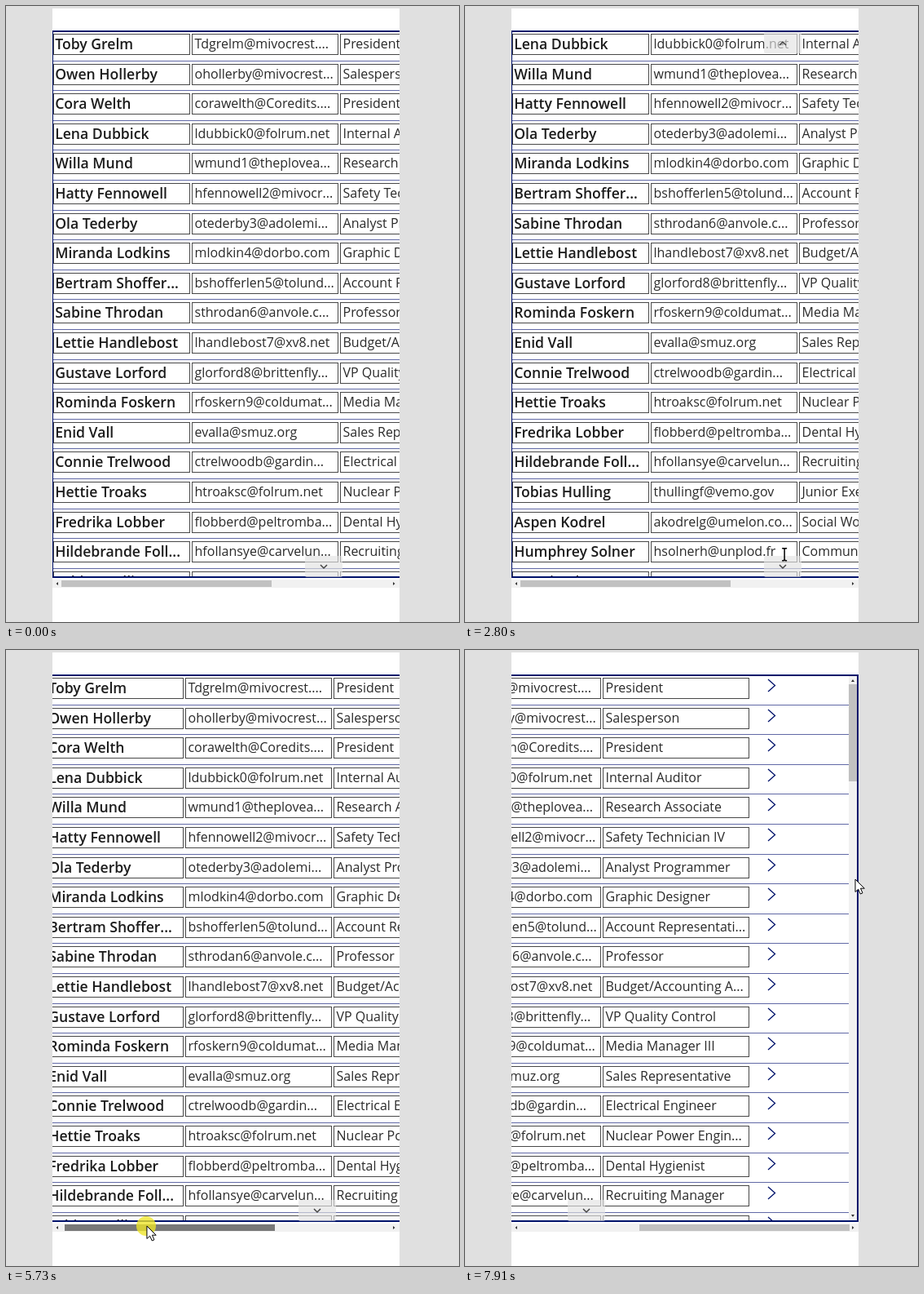
An HTML page for the animation above (8000 ms loop, 556 by 755 pixels).

```html
<!DOCTYPE html>
<html lang="en">
<head>
<meta charset="utf-8">
<style>
  html, body { margin: 0; height: 100%; overflow: hidden; background: #e0e0e0; }
  div, svg { position: absolute; box-sizing: border-box; }
  #page { left: 57px; top: 3px; width: 426px; height: 752px; background: #fff; overflow: hidden; }
  #view { left: -57px; top: -3px; width: 724px; height: 755px; }
  #list { left: 57px; top: 30px; width: 667px; height: 669px; overflow: hidden; }
  #frame { left: 57px; top: 30px; width: 667px; height: 671px; border: 2px solid #00126b; border-left-width: 1px; }
  .row { left: 0; width: 655px; height: 37px; border-top: 1px solid #6169a6; }
  .cell { top: 3px; width: 180px; height: 26px; border: 1px solid #484848; padding-left: 2.5px;
    font: 16px/22px "Open Sans", sans-serif; color: #2a2a2a; white-space: nowrap; overflow: hidden; }
  .name { left: 1px; width: 168px; padding-left: 1.2px; font-size: 17.6px; font-weight: 600; color: #1c1c1c; }
  .mail { left: 171px; }
  .job { left: 353px; }
  svg { fill: none; overflow: visible; }
  .open { left: 556px; top: 5px; stroke: #00126b; stroke-width: 1.3; }
  .button { left: 367px; width: 46px; height: 26px; border-radius: 2px; background: rgba(226,226,226,.65); }
  .button svg { left: 19px; top: 11px; stroke: #444; stroke-width: 1.5; }
  .button.hover { background: rgba(208,208,208,.92); box-shadow: inset 0 0 0 1px #555; }
  .button.hover svg { stroke: #000; stroke-width: 2; }
  .track { background: #f1f1f1; }
  .thumb { background: #c1c1c1; }
  .arrow { fill: #333; }
  #halo { width: 24px; height: 24px; margin: -12px; border-radius: 50%; background: rgba(238,230,40,.78); }
  #cursors { left: 0; top: 0; width: 1px; height: 1px; fill: #fff; stroke: #000; stroke-linejoin: round; }
</style>
</head>
<body>
<div id="page">
  <div id="view">
    <div id="list"><div id="rows"></div></div>
    <div class="track" style="left:712px;top:32px;width:10px;height:667px">
      <div class="thumb" style="top:10px;width:10px;height:119px"></div>
      <svg class="arrow" width="10" height="667"><path d="M3 7h4l-2-3zM3 660h4l-2 3z"/></svg>
    </div>
    <div id="frame"></div>
    <div id="up" class="button" style="top:32px"><svg width="8" height="5"><path d="M0 5L4 1L8 5"/></svg></div>
    <div id="down" class="button" style="top:674px"><svg width="8" height="5"><path d="M0 0L4 4L8 0"/></svg></div>
  </div>
  <div class="track" style="left:0;top:700px;width:426px;height:10px">
    <div id="thumb" class="thumb" style="top:1px;width:258px;height:8px"></div>
    <svg class="arrow" width="426" height="10"><path d="M7 3v4l-2.500-2zM418 3v4l2.500-2z"/></svg>
  </div>
</div>
<div id="halo"></div>
<svg id="cursors">
  <path id="arrow" d="M0 0V15.500L3.700 12.200L6.300 18L9 16.800L6.500 11.200H11.300Z"/>
  <path id="hand" d="M-2 13V2Q0-1 2 2V8Q4 6 5 8Q7 7 8 9Q10 9 10 11V15Q10 18 8 22H0Q-1 19-5 14Q-6 11-2 13Z"/>
  <path id="beam" fill="none" stroke-width="1.500" d="M-3-7.500H-1L0-6.500L1-7.500H3M0-6.500V6.500M-3 7.500H-1L0 6.500L1 7.500H3"/>
</svg>
<script>
const LOOP = 8000, PITCH = 36.6;
const STEP = 121, START = 290;
const MAX_DRAG = 146, MAX_SCROLL = 241;

const people = `Toby Grelm|Tdgrelm@mivocrest....|President
Owen Hollerby|ohollerby@mivocrest...|Salesperson
Cora Welth|corawelth@Coredits....|President
Lena Dubbick|ldubbick0@folrum.net|Internal Auditor
Willa Mund|wmund1@theplovea...|Research Associate
Hatty Fennowell|hfennowell2@mivocr...|Safety Technician IV
Ola Tederby|otederby3@adolemi...|Analyst Programmer
Miranda Lodkins|mlodkin4@dorbo.com|Graphic Designer
Bertram Shoffer...|bshofferlen5@tolund...|Account Representati...
Sabine Throdan|sthrodan6@anvole.c...|Professor
Lettie Handlebost|lhandlebost7@xv8.net|Budget/Accounting A...
Gustave Lorford|glorford8@brittenfly...|VP Quality Control
Rominda Foskern|rfoskern9@coldumat...|Media Manager III
Enid Vall|evalla@smuz.org|Sales Representative
Connie Trelwood|ctrelwoodb@gardin...|Electrical Engineer
Hettie Troaks|htroaksc@folrum.net|Nuclear Power Engin...
Fredrika Lobber|flobberd@peltromba...|Dental Hygienist
Hildebrande Foll...|hfollansye@carvelun...|Recruiting Manager
Tobias Hulling|thullingf@vemo.gov|Junior Executive
Aspen Kodrel|akodrelg@umelon.co...|Social Worker
Humphrey Solner|hsolnerh@unplod.fr|Community Outreach...
Corwin Plaster|cplasteri@dorvantec...|Marketing Manager`.split("\n");

const $ = id => document.getElementById(id);
$("rows").innerHTML = people.map((line, i) => {
  const [name, mail, job] = line.split("|");
  return `<div class="row" style="top:${i * PITCH}px">
    <div class="cell name">${name}</div><div class="cell mail">${mail}</div><div class="cell job">${job}</div>
    <svg class="open" width="9" height="15"><path d="M0 0L8.500 7.500L0 15"/></svg></div>`;
}).join("");

const entry = [536, 738], overDown = [392, 693], overUp = [396, 46], onThumb = [168, 706], edge = [479, 281];
const scrollDown = [1630, 2220, 2570], scrollUp = [3670, 3900, 4020];
const clicks = [1020, 1630, 2570, 3420, 3790];

const clamp = (v, lo, hi) => Math.max(lo, Math.min(hi, v));
const ramp = (t, start, end) => clamp((t - start) / (end - start), 0, 1);
const mix = (a, b, k) => a.map((v, i) => v + (b[i] - v) * k);
const passed = (times, t) => times.filter(time => time <= t).length;

const dragAt = t => clamp((t - 5708) * .1724, 0, MAX_DRAG);

function pointerAt(t) {
  let p = mix(entry, overDown, ramp(t, START, 770));
  p = mix(p, overUp, ramp(t, 2690, 3310));
  p = mix(p, overDown, ramp(t, 4400, 4880));
  p = mix(p, onThumb, ramp(t, 4880, 5240));
  p[0] += 1.06 * dragAt(t);
  return mix(p, edge, ramp(t, 7300, 7910));
}

function draw(t) {
  const sampled = START + STEP * Math.floor((t - START) / STEP + .2);
  const [x, y] = pointerAt(sampled), drag = dragAt(sampled);
  const scroll = Math.round(drag * MAX_SCROLL / MAX_DRAG);
  const row = passed(scrollDown, t) - passed(scrollUp, t);
  const dragging = t >= 5600 && t < 7080;
  const pressed = dragging || clicks.some(time => t >= time && t < time + STEP);

  $("view").style.left = -57 - scroll + "px";
  $("rows").style.top = -row * PITCH + "px";
  $("thumb").style.left = 11 + Math.floor(drag) + "px";
  const onBar = y > 702 && y < 714 && x > 68 && x < 472;
  $("thumb").style.background = dragging ? "#787878" : onBar ? "#a8a8a8" : "#c1c1c1";

  const overButton = top => x + scroll > 367 && x + scroll < 413 && y > top && y < top + 26;
  const onUp = row > 0 && overButton(32), onDown = overButton(674);
  $("up").style.display = row ? "" : "none";
  $("up").classList.toggle("hover", onUp);
  $("down").classList.toggle("hover", onDown);

  const inRow = (y - 30) % PITCH;
  const onText = y > 30 && y < 700 && x + scroll < 589 && inRow > 4 && inRow < 30;
  const shape = onUp || onDown ? "hand" : onText ? "beam" : "arrow";
  for (const id of ["arrow", "hand", "beam"]) $(id).style.display = id === shape ? "" : "none";
  $("cursors").style.display = t < START ? "none" : "";
  $("cursors").style.transform = `translate(${x}px, ${y}px)`;

  const lift = shape === "hand" ? 3 : 0;
  $("halo").style.display = pressed ? "" : "none";
  $("halo").style.left = x - 1 - lift + "px";
  $("halo").style.top = y - lift + "px";
}

function tick() {
  draw(performance.now() % LOOP);
  requestAnimationFrame(tick);
}
tick();
</script>
</body>
</html>
```
